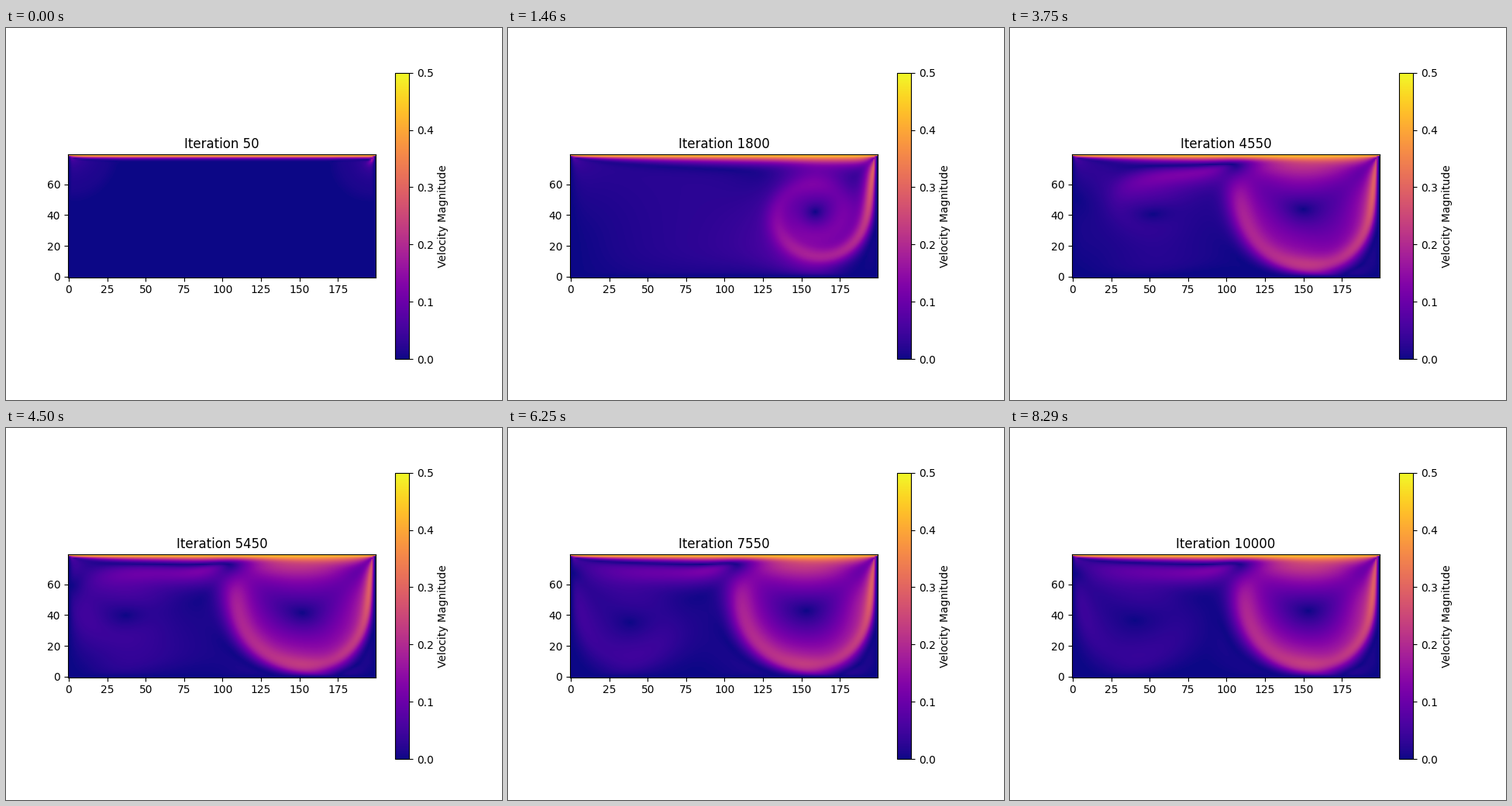
Write a matplotlib script that moves like this. It is 640 px wide and 480 px high and loops after 8330 ms.

```python
import numpy as np
import matplotlib.pyplot as plt
from matplotlib.animation import FuncAnimation

NX, NY = 198, 78     # fluid cells; a ring of wall cells surrounds them
LID = 0.43           # lid speed, cells per step
NU = 0.02            # kinematic viscosity
FRAMES, STEPS = 200, 50
LOOP_MS = 8330

# D2Q9 lattice: rest, E, N, W, S, NE, NW, SW, SE
CX = (0, 1, 0, -1, 0, 1, -1, -1, 1)
CY = (0, 0, 1, 0, -1, 1, 1, -1, -1)
OPP = (0, 3, 4, 1, 2, 7, 8, 5, 6)
WEIGHT = (4 / 9,) + (1 / 9,) * 4 + (1 / 36,) * 4


def wall_links(f):
    """(wall, fluid) view pairs for half-way bounce-back; lid links come last."""
    links = []
    for k in range(1, 9):
        rows = slice(1 - CY[k], NY + 1 - CY[k])
        cols = slice(1 - CX[k], NX + 1 - CX[k])
        back = f[OPP[k]]
        if CX[k] == 1:
            links.append((f[k, rows, 0], back[1:-1, 1]))
        elif CX[k] == -1:
            links.append((f[k, rows, NX + 1], back[1:-1, NX]))
        if CY[k] == 1:
            links.append((f[k, 0, cols], back[1, 1:-1]))
    for k in (4, 7, 8):
        cols = slice(1 - CX[k], NX + 1 - CX[k])
        links.append((f[k, NY + 1, cols], f[OPP[k], NY, 1:-1]))
    return links


def with_walls(u, v):
    """Speed on the whole grid: still walls, moving lid on top."""
    speed = np.zeros((NY + 2, NX + 2), np.float32)
    speed[1:-1, 1:-1] = np.sqrt(u * u + v * v)
    speed[-1] = LID
    return speed


def simulate():
    """Lid-driven cavity by a central-moment lattice Boltzmann scheme."""
    f = np.empty((9, NY + 2, NX + 2), np.float32)
    for k in range(9):
        f[k] = WEIGHT[k]
    pull = [f[k, 1 - CY[k]:NY + 1 - CY[k], 1 - CX[k]:NX + 1 - CX[k]]
            for k in range(9)]
    inner = [f[k, 1:-1, 1:-1] for k in range(9)]
    links = wall_links(f)
    lid_west, lid_east = links[-2][0], links[-1][0]

    keep = 1 - 1 / (3 * NU + 0.5)    # shear part kept per step
    bulk = 1.2
    rho = np.ones((NY, NX), np.float32)
    fields = []

    for step in range(1, FRAMES * STEPS + 1):
        for wall, edge in links:
            wall[:] = edge
        push = rho[-1] * (LID / 6)
        lid_west -= push
        lid_east += push

        # stream and collect moments
        f0, f1, f2, f3, f4, f5, f6, f7, f8 = pull
        d5, d6 = f5 - f7, f6 - f8
        a5, a6 = f5 + f7, f6 + f8
        diag = a5 + a6
        a2 = f2 + f4
        pxx = f1 + f3
        pxx += diag
        pyy = a2 + diag
        pxy = a5 - a6
        rho = f0 + pxx
        rho += a2
        np.maximum(rho, 0.4, out=rho)
        np.minimum(rho, 1.8, out=rho)
        u = f1 - f3
        u += d5
        u -= d6
        u /= rho
        v = f2 - f4
        v += d5
        v += d6
        v /= rho
        for w in (u, v):
            np.maximum(w, -LID, out=w)
            np.minimum(w, LID, out=w)

        # relax the second-order central moments
        ru, rv = rho * u, rho * v
        uu, vv, uv = ru * u, rv * v, ru * v
        kxx, kyy = pxx - uu, pyy - vv
        kxy = (pxy - uv) * keep
        dif = (kxx - kyy) * (keep / 2)
        mean = (kxx + kyy) * ((1 - bulk) / 2)
        mean += rho * (bulk / 3)
        kxx, kyy = mean + dif, mean - dif

        # back to raw moments
        m20, m02, m11 = kxx + uu, kyy + vv, kxy + uv
        kxy *= 2
        part = v * kxx
        part += u * kxy
        m21 = part + v * uu
        m12 = u * m02
        m12 += v * kxy
        m22 = u * m12
        m22 += v * part
        m22 += rho * (1 / 9)

        # rebuild the populations
        rest = rho - m20
        rest -= m02
        np.add(rest, m22, out=inner[0])
        even, odd = (m20 - m22) * 0.5, (ru - m12) * 0.5
        np.add(even, odd, out=inner[1])
        np.subtract(even, odd, out=inner[3])
        even, odd = (m02 - m22) * 0.5, (rv - m21) * 0.5
        np.add(even, odd, out=inner[2])
        np.subtract(even, odd, out=inner[4])
        even, odd = (m22 + m11) * 0.25, (m12 + m21) * 0.25
        np.add(even, odd, out=inner[5])
        np.subtract(even, odd, out=inner[7])
        even, odd = (m22 - m11) * 0.25, (m12 - m21) * 0.25
        np.add(even, odd, out=inner[8])
        np.subtract(even, odd, out=inner[6])

        if step % STEPS == 0:
            fields.append(with_walls(u, v))
    return fields


speeds = simulate()

fig, ax = plt.subplots(figsize=(6.4, 4.8), dpi=100)
image = ax.imshow(speeds[0], origin="lower", cmap="plasma", vmin=0, vmax=0.5)
fig.colorbar(image, ax=ax, label="Velocity Magnitude")
title = ax.set_title("")


def update(i):
    image.set_data(speeds[i])
    title.set_text(f"Iteration {(i + 1) * STEPS}")
    return image, title


anim = FuncAnimation(fig, update, frames=FRAMES, init_func=lambda: update(0),
                     interval=LOOP_MS / FRAMES, repeat=True, repeat_delay=0,
                     blit=False)
plt.show()
```
